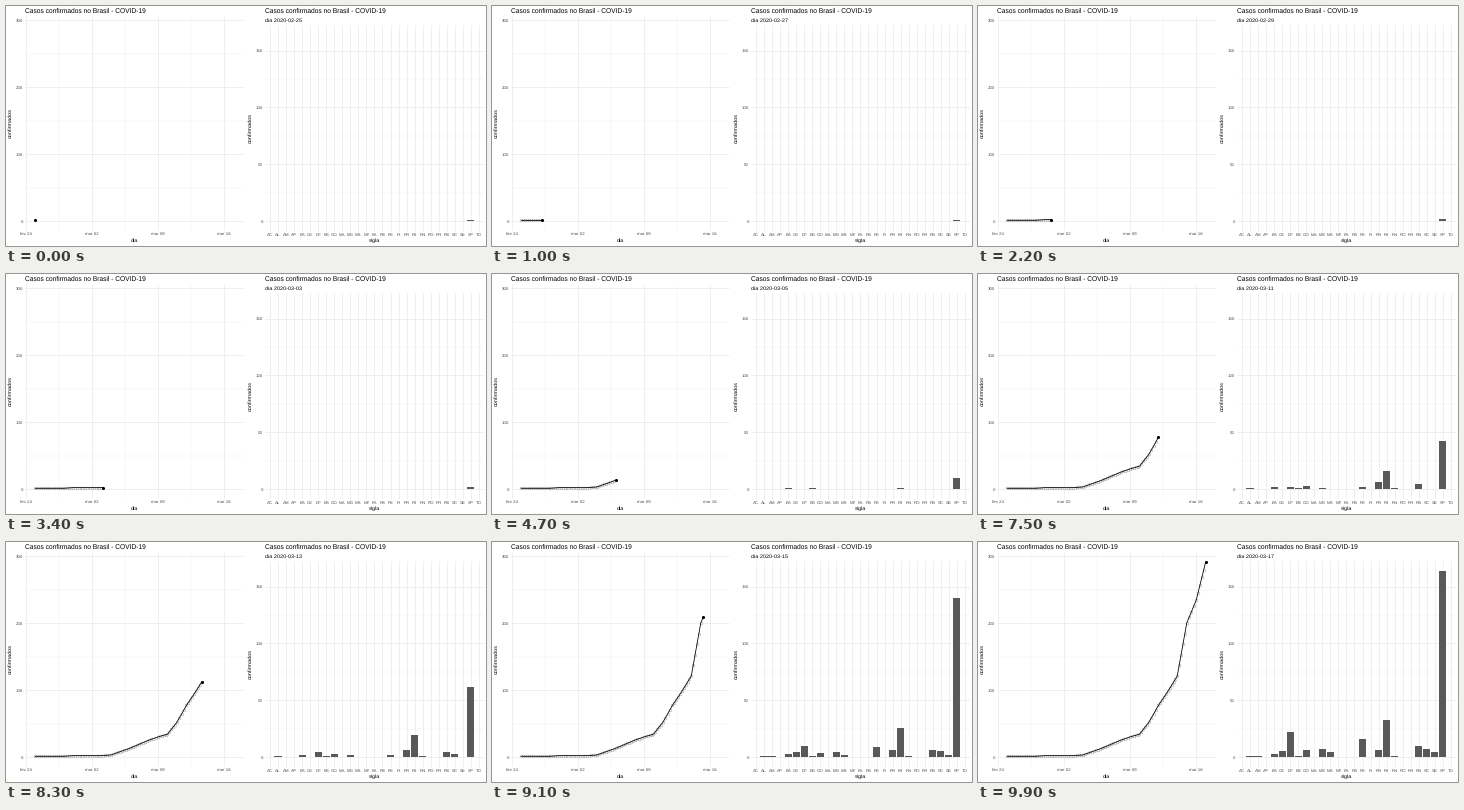
Recreate the animation shown at these times as a matplotlib script. Size 480 px wide and 240 px high, loop 10 s.

```python
import matplotlib.pyplot as plt
import numpy as np
from matplotlib.animation import FuncAnimation
from matplotlib.patches import Rectangle

W, H, DPI = 480, 240, 100
FRAMES, DAYS = 100, 21
PT = 72 / DPI
GRID, TICK, BAR = "#ebebeb", "#4d4d4d", "#595959"

plt.rcParams.update({"font.family": "Liberation Sans", "text.hinting": "none"})

TOTALS = [1, 1, 1, 1, 2, 2, 2, 2, 3, 8, 13, 19, 25, 30, 34, 52, 77, 98,
          121, 200, 234, 291]
STATES = ("AC AL AM AP BA CE DF ES GO MA MG MS MT PA PB PE PI PR RJ RN RO "
          "RR RS SC SE SP TO").split()
# First day with a case, then the running total of each day up to the last.
CASES = {
    "SP": (0, [1] * 4 + [2] * 4 + [3, 6, 10, 13, 16, 16, 19, 30, 42, 56,
                                   65, 136, 152, 164]),
    "RJ": (9, [1, 1, 2, 3, 8, 8, 13, 16, 16, 22, 24, 31, 33]),
    "BA": (10, [1] + [2] * 9 + [3, 3]),
    "ES": (10, [1] * 12),
    "DF": (11, [1, 1, 1, 1, 2, 2, 2, 6, 8, 13, 22]),
    "AL": (12, [1] * 10),
    "MG": (12, [1] * 5 + [2, 2, 4, 5, 7]),
    "RS": (14, [1, 2, 4, 4, 5, 6, 7, 10]),
    "PR": (16, [6] * 6),
    "GO": (16, [3, 3, 3, 3, 4, 6]),
    "PE": (16, [2, 2, 2, 7, 15, 16]),
    "RN": (16, [1] * 6),
    "SC": (17, [2, 3, 5, 6, 7]),
    "AM": (18, [1] * 4),
    "SE": (18, [1, 1, 3, 4]),
    "CE": (19, [4, 4, 5]),
    "MS": (19, [2, 2, 4]),
}

KEYS = np.round(np.arange(DAYS + 1) * (FRAMES - 1) / DAYS)
STEPS = np.arange(FRAMES)

BASE = 215.0                       # pixel row of zero in both panels


def left_y(v):
    return BASE - 0.67 * np.asarray(v)


def right_y(v):
    return BASE - 1.136 * np.asarray(v)


def day_x(d):
    return 29.2 + 9.45 * np.asarray(d)


def state_x(k):
    return 264 + 8.035 * k


fig = plt.figure(figsize=(W / DPI, H / DPI), dpi=DPI, facecolor="white")
ax = fig.add_axes([0, 0, 1, 1])
ax.set(xlim=(0, W), ylim=(H, 0))
ax.axis("off")


def text(x, y, s, size, color="black", ha="center", va="center", **kw):
    return ax.text(x, y, s, fontsize=size * PT, color=color, ha=ha, va=va, **kw)


def rule(xs, ys, width):
    ax.plot(xs, ys, color=GRID, lw=width * PT, zorder=1,
            solid_capstyle="butt")


def panel(x0, x1, top, to_y, step, count, xlabel, label_y):
    for k in range(count):
        y = to_y(k * step)
        rule((x0, x1), (y, y), 0.75)
        text(x0 - 2.2, y + 0.2, str(k * step), 4.4, TICK, ha="right",
             va="center_baseline")
        mid = to_y((k + 0.5) * step)
        if mid > top:
            rule((x0, x1), (mid, mid), 0.4)
    text(x0, 7, "Casos confirmados no Brasil - COVID-19", 6.6, ha="left",
         va="baseline")
    text((x0 + x1) / 2, 236, xlabel, 5.5, va="baseline")
    text(x0 - 14.8, label_y, "confirmados", 5.5, rotation=90)


panel(19.3, 237.4, 10.2, left_y, 100, 4, "dia", 117.5)
for k, name in enumerate(("fev 24", "mar 02", "mar 09", "mar 16")):
    x = day_x(7 * k - 1)
    rule((x, x), (10.2, 224.3), 0.75)
    text(x, 229.4, name, 4.4, TICK, va="baseline")
    if k < 3:
        rule((x + 33.1, x + 33.1), (10.2, 224.3), 0.4)

panel(259.2, 477.6, 19.4, right_y, 50, 4, "sigla", 122)
for k, name in enumerate(STATES):
    x = state_x(k)
    rule((x, x), (19.4, 224.5), 0.75)
    text(x, 229.6, name, 4.4, TICK, va="baseline")

subtitle = text(259.2, 15.6, "", 5.5, ha="left", va="baseline")

path_x = day_x(np.interp(STEPS, KEYS, np.arange(DAYS + 1)))
path_y = left_y(np.interp(STEPS, KEYS, TOTALS))
trail, = ax.plot([], [], "o", ms=2.8 * PT, mfc="white", mec="#8c8c8c",
                 mew=0.4 * PT, zorder=2)
line, = ax.plot([], [], color="black", lw=0.8 * PT, zorder=3)
dot, = ax.plot([], [], "o", ms=3.1 * PT, color="black", mew=0, zorder=4)

bars = []
for name, (first, values) in CASES.items():
    rect = Rectangle((state_x(STATES.index(name)) - 3.6, BASE), 7.2, 0,
                     fc=BAR, lw=0, zorder=2)
    ax.add_patch(rect)
    bars.append((rect, KEYS[first], np.interp(STEPS, KEYS[first:], values)))


def draw(i):
    day = np.datetime64("2020-02-25") + i * DAYS // (FRAMES - 1)
    subtitle.set_text(f"dia {day}")
    trail.set_data(path_x[:i], path_y[:i])
    line.set_data(path_x[:i + 1], path_y[:i + 1])
    dot.set_data(path_x[i:i + 1], path_y[i:i + 1])
    for rect, start, values in bars:
        rect.set_visible(i >= start)
        rect.set_height(right_y(values[i]) - BASE)
    return [subtitle, trail, line, dot] + [b[0] for b in bars]


anim = FuncAnimation(fig, draw, frames=FRAMES, interval=100, repeat=True,
                     repeat_delay=0, blit=False)
plt.show()
```
